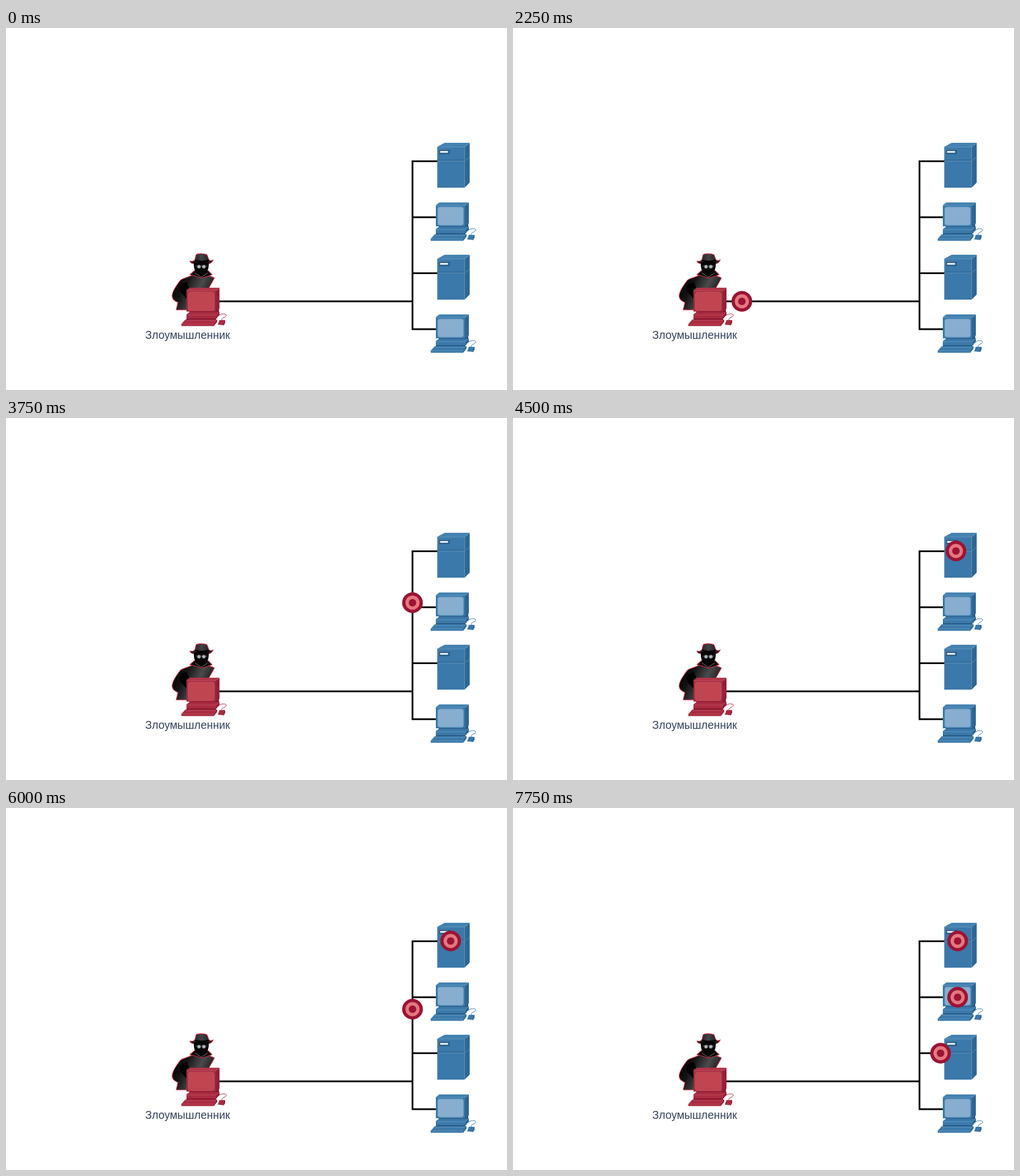
Recreate the animation shown at these times as an HTML page. Size 880 px wide and 637 px high, loop 8000 ms.

```html
<!DOCTYPE html>
<html lang="ru">
<head>
<meta charset="utf-8">
<title>Злоумышленник</title>
<style>
  html, body { margin: 0; width: 100%; height: 100%; overflow: hidden; background: #fff; }
  svg { display: block; width: 100vw; height: 100vh; }
  .blue { --front: #3b79aa; --top: #4482b0; --side: #2e6694; --screen: #87aecf; --edge: #6a9cc3; --dark: #285b86; }
  .red { --front: #a92b40; --top: #b03548; --side: #93213a; --screen: #c04550; --edge: #c05562; --dark: #86182f; }
  .front { fill: var(--front); }
  .top { fill: var(--top); }
  .side { fill: var(--side); }
  .dark { fill: var(--dark); }
  .screen { fill: var(--screen); stroke: var(--edge); }
  .edge { fill: none; stroke: var(--edge); stroke-width: .8; }
  .cable { fill: none; stroke: var(--front); stroke-width: 1; }
  text { font: 19.4px "Liberation Sans", Arial, sans-serif; fill: #34435f; }
</style>
</head>
<body>
<svg viewBox="0 0 880 637">
  <defs>
    <linearGradient id="coat" x1="0" y1=".2" x2="1" y2=".6">
      <stop offset="0" stop-color="#000"/>
      <stop offset=".3" stop-color="#141414"/>
      <stop offset=".62" stop-color="#4b4b4d"/>
      <stop offset="1" stop-color="#080808"/>
    </linearGradient>
    <linearGradient id="felt">
      <stop offset="0" stop-color="#101010"/>
      <stop offset=".5" stop-color="#444446"/>
      <stop offset="1" stop-color="#0c0c0c"/>
    </linearGradient>

    <g id="server">
      <path class="top" d="M0 7L13 0H57L48 7Z"/>
      <path class="side" d="M48 7L57 0V70L48 79Z"/>
      <path class="front" d="M0 7H48V79H0Z"/>
      <path class="edge" d="M0 7.5H48L57 .5M0 32H48L57 25"/>
      <path class="dark" d="M0 30H48V31H0Z"/>
      <path class="dark" d="M2 11H22V20H2Z"/>
      <path class="edge" d="M2.5 19.5V11.5H21.5"/>
      <path d="M5 14.5H19V17.5H5Z" fill="#f3f8fb"/>
    </g>

    <g id="computer">
      <path class="dark" d="M14 41H59L66 37V44L60 48H14Z"/>
      <path class="front" d="M9 47L14 43H67L63 49V54H9Z"/>
      <path class="side" d="M61 48L67 42V48L61 54Z"/>
      <path class="edge" d="M10 48H61L66 43"/>
      <path class="dark" d="M9 54H61V56H9Z"/>
      <path class="front" d="M7 56H63L57 64H0Z"/>
      <path class="front" d="M0 63.5H57V67.5H0Z"/>
      <path class="side" d="M57 63.5L63 56V60L57 67.5Z"/>
      <path class="edge" d="M7 58H60M1 64H56.5"/>
      <path class="top" d="M9 5L15 0H67L60 5Z"/>
      <path class="side" d="M60 5L67 0V37L60 42Z"/>
      <path class="front" d="M9 5H60V42H9Z"/>
      <path class="edge" d="M9 5.3H60L67 .5"/>
      <path class="dark" d="M63 9L66 7V8.5L63 10.5ZM63 13L66 11V12.5L63 14.5Z"/>
      <rect class="screen" x="12.5" y="8" width="45" height="32" rx="3.5"/>
      <path class="cable" d="M64 51C68 45 78 45 79 48C80 52 70 52 71 57"/>
      <path class="front" d="M67 57H77L74 66L64 65Z"/>
      <path class="side" d="M74 62L77 57V62L74 67Z"/>
    </g>

    <g id="target">
      <circle r="18.2" fill="#9b1434"/>
      <circle r="12.4" fill="#e5777f"/>
      <circle r="6.6" fill="#9b1434"/>
    </g>
  </defs>

  <rect width="880" height="637" fill="#fff"/>
  <path d="M372 481H714M760 234.5H714V530H758M714 333H758M714 431.5H760"
        fill="none" stroke="#000" stroke-width="3"/>

  <g class="blue">
    <use href="#server" x="757.5" y="202"/>
    <use href="#computer" x="746" y="307"/>
    <use href="#server" x="757.5" y="399"/>
    <use href="#computer" x="746" y="504"/>
  </g>

  <g stroke="#cf2b41" stroke-width="1.2" stroke-linejoin="round">
    <path d="M327 435C315 441 308 440 304 447C298 455 291 466 292 473C293 479 298 481 302 483L299 496H330L356 458L366 440C361 436 355 437 351 433Z" fill="url(#coat)"/>
    <path d="M331 427L323 434L331 436L343 440L354 437L362 434L355 427Z" fill="#0c0c0c"/>
    <path d="M323 410C327 411 331 410 332 407L334 399C338 396 348 397 353 399L356 407C358 410 361 410 364 408C362 413 358 415 353 415H333C328 415 324 413 323 410Z" fill="url(#felt)"/>
  </g>
  <path d="M330 412C329 425 333 433 343 438C353 433 357 425 356 412Z" fill="#060606"/>
  <path d="M304 458L308 450L318 447L322 458H317V476L307 465Z" fill="#000"/>
  <path d="M332 409Q344 413 356 409" fill="none" stroke="#050505" stroke-width="3"/>
  <path d="M332 431L343 438.5L354 431" fill="none" stroke="#77777a"/>
  <g fill="#b3b7b9" stroke="#6a6e70">
    <path d="M333 419H353"/>
    <circle cx="339" cy="420" r="3"/>
    <circle cx="347.5" cy="420" r="3"/>
  </g>

  <use class="red" href="#computer" x="308" y="457"/>
  <text x="244.5" y="546.5">Злоумышленник</text>
  <g id="targets"></g>
</svg>
<script>
  const LOOP = 8000, STEP = 250;
  const START_X = 345, LINE_Y = 481, TRUNK_X = 714;
  const ALONG = TRUNK_X - START_X;

  // Each track pairs a time with the distance travelled along the wire.
  const attacks = [
    { y: 234, show: 1250, track: [[2080, 0], [2250, 57], [3250, 392], [3750, 525], [4200, 636], [4500, 680], [4700, 683]] },
    { y: 333, show: 4750, track: [[4630, 0], [4750, 46], [5250, 239], [6000, 496], [6350, 584]] },
    { y: 431.5, show: 6500, track: [[6450, 0], [6750, 114], [7000, 209], [7750, 455.5]] }
  ];

  const clamp = (v, lo, hi) => Math.max(lo, Math.min(hi, v));

  function travelled(track, t) {
    if (t <= track[0][0]) return 0;
    const i = track.findIndex(([time]) => time >= t);
    if (i < 0) return track[track.length - 1][1];
    const [t0, s0] = track[i - 1], [t1, s1] = track[i];
    return s0 + (s1 - s0) * (t - t0) / (t1 - t0);
  }

  function position(s, rowY) {
    const rise = LINE_Y - rowY;
    const sideways = Math.max(0, s - ALONG - rise);
    const settle = 4 * (1 - clamp(s / 40, 0, 1));
    return [
      START_X + Math.min(s, ALONG) + sideways,
      LINE_Y + settle - clamp(s - ALONG, 0, rise)
    ];
  }

  const layer = document.getElementById("targets");
  for (const attack of attacks) {
    attack.node = document.createElementNS("http://www.w3.org/2000/svg", "use");
    attack.node.setAttribute("href", "#target");
    layer.append(attack.node);
  }

  function draw(t) {
    for (const { y, show, track, node } of attacks) {
      const fading = t < track[0][0] && t < show + STEP;
      node.setAttribute("opacity", t < show ? 0 : fading ? 0.5 : 1);
      node.setAttribute("transform", `translate(${position(travelled(track, t), y)})`);
    }
  }

  const begin = performance.now();
  function tick() {
    const t = (performance.now() - begin) % LOOP;
    draw(Math.floor(t / STEP) * STEP);
    requestAnimationFrame(tick);
  }
  tick();
</script>
</body>
</html>
```
